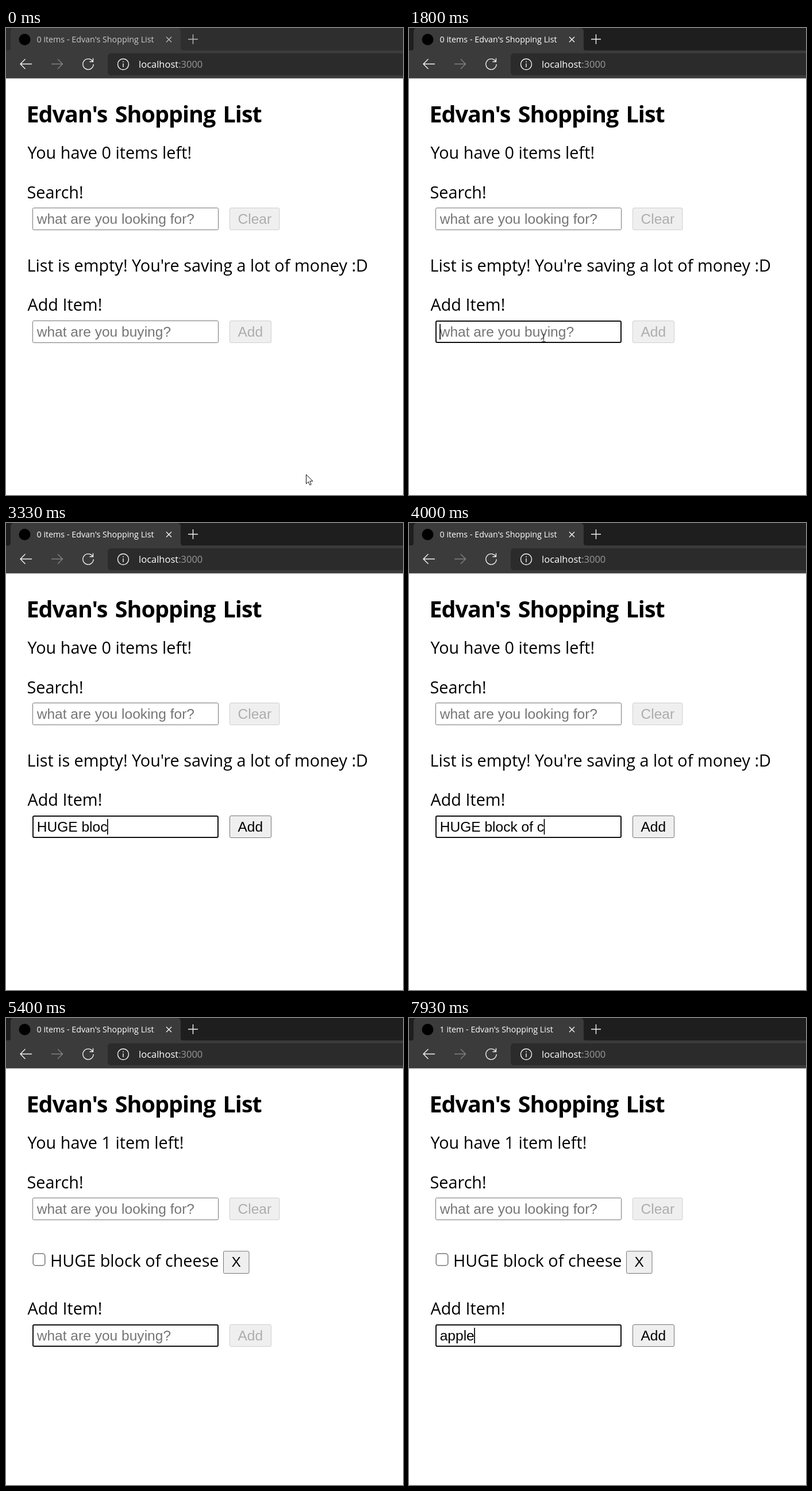
Recreate the animation shown at these times as an HTML page. Size 691 by 811 pixels, loop 8000 ms.

```html
<!DOCTYPE html>
<html lang="en">
<head>
<meta charset="utf-8">
<title>Shopping List</title>
<style>
  html, body { margin: 0; width: 100%; height: 100%; overflow: hidden; background: #fff; }
  svg { display: block; width: 100%; height: 100%; }
  text { white-space: pre; }
  .page { font: 28.8px "Open Sans", "Noto Sans", sans-serif; }
  .heading { font: 700 39.5px "Open Sans", "Noto Sans", sans-serif; letter-spacing: -1px; word-spacing: 4px; }
  .form { font: 24.55px "Liberation Sans", Arial, sans-serif; }
  .tab { font: 14.3px "Open Sans", "Noto Sans", sans-serif; }
  .url { font: 16.5px "Open Sans", "Noto Sans", sans-serif; }
  .icon { fill: none; stroke: #f4f4f4; stroke-width: 1.4; }
  .hint { fill: #757575; }
  .field { fill: #fff; stroke: #767676; }
  .field.focus { stroke: #101010; stroke-width: 2; }
  .button rect { fill: #efefef; stroke: #767676; }
  .button.off rect { stroke: #cfcfcf; }
  .button.off text { fill: #adadad; }
</style>
</head>
<body>
<svg viewBox="0 0 691 811" preserveAspectRatio="none">
  <!-- Browser chrome -->
  <rect id="strip" width="691" height="40"/>
  <path d="M4 39Q8 39 8 35V6Q8 0 14 0H298Q304 0 304 6V35Q304 39 308 39H691V87.5H0V39Z" fill="#3b3b3b"/>
  <circle cx="32.5" cy="20" r="10"/>
  <text id="title" class="tab" x="53.5" y="24.5"></text>
  <path id="tabIcons" class="icon" d="M279 15.5l9 9m0-9l-9 9M317 19.5h17m-8.5-8.5v17"/>
  <path class="icon" d="M45 62.5H25m8.5-8.5l-8.5 8.5 8.5 8.5"/>
  <path class="icon" d="M79 62.5h19.5m-8.5-8.5l8.5 8.5-8.5 8.5" style="stroke:#828282"/>
  <path class="icon" d="M150.5 57.5A9.2 9.2 0 1 0 152.2 63M151.5 52.5v6h-6"/>
  <path d="M691 44H183Q177 44 177 50V76Q177 82 183 82H691Z" fill="#2b2b2b"/>
  <circle class="icon" cx="204" cy="63" r="9.5"/>
  <path class="icon" d="M204 61.5v6.5M204 57.5v2"/>
  <text class="url" x="231" y="68.5" fill="#fff">localhost<tspan fill="#9a9a9a">:3000</tspan></text>

  <!-- Page -->
  <text class="heading" x="35.5" y="164">Edvan's Shopping List</text>
  <g class="page">
    <text id="count" x="37.5" y="226.5"></text>
    <text x="36.5" y="295.5">Search!</text>
  </g>
  <g class="form">
    <rect class="field" x="46.5" y="312.5" width="323" height="38" rx="2"/>
    <text class="hint" x="53.7" y="340">what are you looking for?</text>
    <g class="button off">
      <rect x="389.5" y="312.5" width="86.5" height="38" rx="2.5"/>
      <text x="403.5" y="340">Clear</text>
    </g>
  </g>

  <text id="empty" class="page" x="36.5" y="422.5">List is empty! You're saving a lot of money :D</text>
  <g id="item">
    <rect x="47.25" y="409.25" width="20.5" height="20.5" rx="4" fill="#fff" stroke="#767676" stroke-width="1.5"/>
    <text class="page" x="77" y="432">HUGE block of cheese</text>
    <g class="button form">
      <rect x="378.5" y="405" width="44.5" height="38.5" rx="2"/>
      <text x="392.5" y="432">X</text>
    </g>
  </g>

  <g id="adder">
    <text class="page" x="37.5" y="491">Add Item!</text>
    <g class="form">
      <rect id="field" class="field" x="46.5" y="508.5" width="323" height="38" rx="2"/>
      <text id="entry" x="53.7" y="536"></text>
      <g id="add" class="button">
        <rect x="389.5" y="508.5" width="72" height="38" rx="2.5"/>
        <text x="403.5" y="536">Add</text>
      </g>
    </g>
    <rect id="caret" y="514" width="1.7" height="27"/>
  </g>

  <path id="arrow" d="M.5.5V16.5L4.3 13 6.8 18.7 9.3 17.6 6.9 12H12Z" fill="#fff" stroke="#111"/>
  <path id="beam" d="M-3-6.5H-1.5L0-5.5 1.5-6.5H3M0-5.5V5.5M-3 6.500H3" fill="none" stroke="#333"/>
</svg>
<script>
const LOOP = 8000, FOCUS = 730, BLINK = 533, ADDED = 5400, RETITLED = 5600;

// Key presses: text and the time each character appears
const words = [
  { text: "HUGE block of cheese", start: 2330, end: ADDED,
    keys: [2330, 2470, 2530, 2670, 2800, 2870, 2930, 3200, 3330, 3400,
           3530, 3600, 3730, 3800, 4000, 4200, 4330, 4470, 4600, 4730] },
  { text: "apple", start: 7400, end: LOOP, keys: [7400, 7530, 7670, 7800, 7930] }
];
const LAST_KEY = words[0].keys.at(-1);
// Pointer stops: time, x, y
const arrowStops = [[0, 522, 775], [70, 448, 718], [130, 304, 603], [200, 232, 548],
                    [470, 233, 562], [530, 236, 577], [600, 235, 558]];
const BEAM_SHOWN = 670;

const $ = id => document.getElementById(id);
const [strip, title, tabIcons, count, empty, item, adder, field, entry, add, caret, arrow, beam] =
  ["strip", "title", "tabIcons", "count", "empty", "item", "adder", "field", "entry", "add", "caret", "arrow", "beam"].map($);
const show = (el, on) => { el.style.visibility = on ? "visible" : "hidden"; };
const setText = (el, text) => { if (el.textContent !== text) el.textContent = text; };
const setAttrs = (el, attrs) => { for (const k in attrs) el.setAttribute(k, attrs[k]); };

function caretOn(t, pressed) {
  if (t < FOCUS) return false;
  const since = pressed.length ? pressed.at(-1) : t < LAST_KEY ? FOCUS : LAST_KEY;
  return Math.floor((t - since + 8) / BLINK) % 2 === 0;
}

function drawTab(t, focused) {
  strip.setAttribute("fill", focused ? "#1e1e1e" : "#2e2e2e");
  title.setAttribute("fill", focused ? "#fff" : "#c8c8c8");
  tabIcons.style.stroke = focused ? "#f4f4f4" : "#b8b8b8";
  setText(title, (t < RETITLED ? "0 items" : "1 item") + " - Edvan's Shopping List");
}

function drawAdder(t, focused, added) {
  const word = words.find(w => t >= w.start && t < w.end);
  const pressed = word ? word.keys.filter(k => k <= t) : [];
  const typed = word ? word.text.slice(0, pressed.length) : "";

  adder.setAttribute("transform", `translate(0 ${added ? 24 : 0})`);
  field.classList.toggle("focus", focused);
  setAttrs(field, focused
    ? { x: 47, y: 509, width: 322, height: 37 }
    : { x: 46.5, y: 508.5, width: 323, height: 38 });
  entry.classList.toggle("hint", !typed);
  setText(entry, typed || "what are you buying?");
  add.classList.toggle("off", !typed);
  caret.setAttribute("x", 53.2 + (typed ? entry.getComputedTextLength() : 0));
  show(caret, caretOn(t, pressed));
}

function drawPointer(t) {
  const [, x, y] = arrowStops.filter(s => s[0] <= t).pop();
  arrow.setAttribute("transform", `translate(${x} ${y})`);
  beam.setAttribute("transform", "translate(234.5 538)");
  show(arrow, t < BEAM_SHOWN);
  show(beam, t >= BEAM_SHOWN && t < words[0].start);
}

function draw(t) {
  const focused = t >= FOCUS, added = t >= ADDED;
  drawTab(t, focused);
  setText(count, `You have ${added ? "1 item" : "0 items"} left!`);
  show(empty, !added);
  show(item, added);
  drawAdder(t, focused, added);
  drawPointer(t);
}

const begin = performance.now();
function tick() {
  draw((performance.now() - begin) % LOOP);
  requestAnimationFrame(tick);
}
tick();
</script>
</body>
</html>
```
